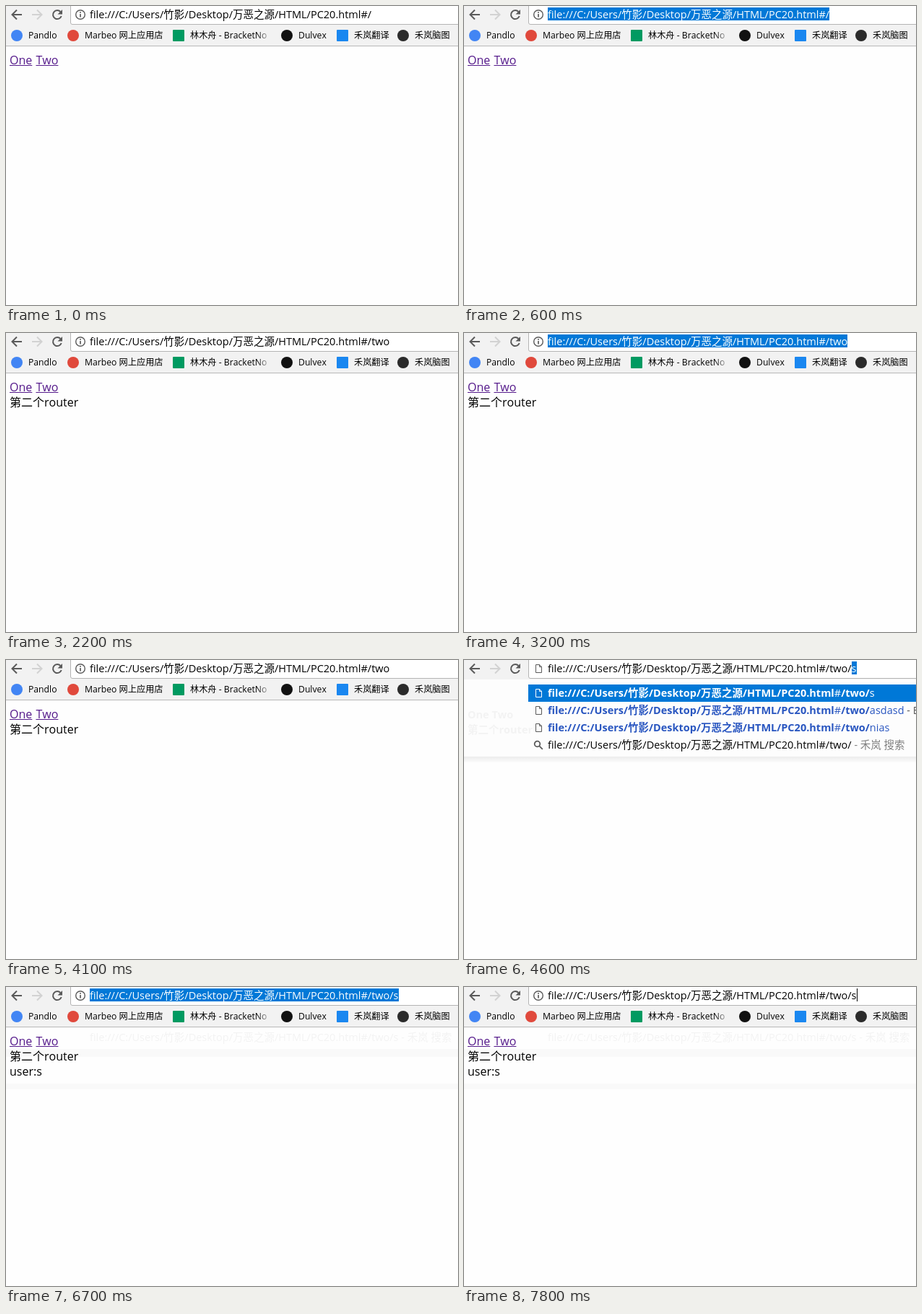
An HTML page for the animation above (8 s loop, 626 by 415 pixels).

```html
<!DOCTYPE html>
<html lang="zh-CN">
<head>
<meta charset="utf-8">
<style>
  html, body { margin: 0; width: 100%; height: 100%; overflow: hidden; }
  body {
    position: relative; background: #fefefe; color: #000; white-space: pre;
    font: 14.5px/19px "Open Sans", "Noto Sans CJK SC", "Noto Sans CJK", sans-serif;
    font-kerning: none;
  }
  body > *, .mark, .mark i, .row, .row svg, .row span, .ghost { position: absolute; }
  #toolbar { left: 0; top: 0; width: 100%; height: 55px; background: #f2f2f2; border-bottom: 1px solid #b8b8b8; }
  #address { left: 89px; top: -4px; width: 560px; height: 28px; background: #fff; border: 1px solid #b4b4b4; border-radius: 3px; }
  #icons, #marks { left: 0; top: 0; }
  #url { left: 116px; top: 2px; height: 18px; display: flex; }
  #url b { font-weight: 400; height: 18px; }
  #url b.on { background: #0078d7; color: #fff; }
  #url i { width: 1px; height: 18px; background: #000; }
  .mark { top: 30px; height: 23px; padding: 0 5px 0 30px; border-radius: 3px; font-size: 12.2px; line-height: 22px; }
  .mark i { left: 6px; top: 3px; width: 16px; height: 16px; }
  .fade { display: block; width: 113px; overflow: hidden; -webkit-mask: linear-gradient(90deg, #000 82%, transparent); mask: linear-gradient(90deg, #000 82%, transparent); }
  #page { left: 5px; top: 65px; font-size: 16px; line-height: 21px; word-spacing: 1px; }
  #page u { color: #551a8b; text-decoration-thickness: 1px; }
  .drop { left: 0; top: 27px; width: 100%; background: #fdfdfd; }
  .drop::after { content: ""; position: absolute; left: 0; top: 100%; width: 100%; height: 8px; background: linear-gradient(#ececec, #fbfbfb); }
  .row { left: 89px; right: 0; height: 24px; overflow: hidden; color: #2956c0; }
  .row svg { left: -89px; top: 0; }
  .row span { left: 27px; top: 2px; }
  .row em { font-style: normal; font-weight: 400; }
  .row.top { background: #0078d7; color: #fff; }
  .row.search { color: #000; }
  .row.search small { font-size: inherit; color: #808080; }
  .ghost { color: #f3f3f3; }
  .drop .ghost { font-weight: 700; }
  #afterglow { left: 0; top: 0; width: 100%; }
  #afterglow .band { position: absolute; left: 0; width: 100%; background: #f9f9f9; }
</style>
</head>
<body>
<div id="afterglow"></div>
<div id="page"></div>
<div id="toolbar"></div>
<div id="address"></div>
<div id="marks"></div>
<div id="full" class="drop" style="height:107px"></div>
<div id="short" class="drop" style="height:59px"></div>
<svg id="icons" width="115" height="25" fill="none" stroke="#5a5a5a" stroke-width="2">
  <path d="M22 12H9M15 5.500l-6.500 6.500 6.500 6.500"/>
  <path d="M36 12h13M43 5.500l6.500 6.500-6.500 6.500" stroke="#d2d2d2"/>
  <path d="M75.500 8A6 6 0 1 0 76.700 14"/>
  <path d="M78 5v6.500h-6.500z" fill="#5a5a5a" stroke="none"/>
  <g id="info" stroke-width="1.400"><circle cx="103" cy="12" r="6.300"/><path d="M103 11v4.500M103 8v1.700" stroke-width="1.700"/></g>
  <g id="doc" stroke-width="1"></g>
</svg>
<div id="url"></div>
<script>
const $ = id => document.getElementById(id);
const base = 'file:///C:/Users/竹影/Desktop/万恶之源/HTML/PC20.html#/';
const boldBase = base.replace('#', '<em>#</em>') + 'two/';
const docPath = '<path d="M99.5 6.500h5l3 3v8h-8zM104.500 6.500v3h3"/>';
const lensPath = '<g stroke-width="1.800"><circle cx="101.500" cy="10.500" r="3.800"/><path d="M104.300 13.300l4.500 4.500"/></g>';
$('doc').innerHTML = docPath;

const bookmarks = [
  [1, 'Pandlo', '#4285f4', true],
  [79, 'Marbeo 网上应用店', '#e0493c', true],
  [225, '<span class="fade">林木舟 - BracketNo</span>', '#009a61', false],
  [375, 'Dulvex', '#111', true],
  [452, '禾岚翻译', '#1a87f0', false],
  [536, '禾岚脑图', '#2b2b2b', true],
];
$('marks').innerHTML = bookmarks.map(([x, label, color, round]) =>
  `<div class="mark" style="left:${x}px"><i style="background:${color};border-radius:${round ? 8 : 1}px"></i>${label}</div>`).join('');
const marks = [...$('marks').children];

function row(index, html, kind = '') {
  const stroke = kind === 'top' ? '#fff' : '#5a5a5a';
  const icon = kind === 'search' ? lensPath : docPath;
  return `<div class="row ${kind}" style="top:${7 + index * 24}px">
    <svg width="115" height="24" fill="none" stroke="${stroke}">${icon}</svg><span>${html}</span></div>`;
}
const match = tail => `<b>${boldBase}</b>${tail}`;
const search = tail => `${base}two/${tail}<small> - 禾岚 搜索</small>`;
const ghost = (x, y, text) => `<div class="ghost" style="left:${x}px;top:${y}px">${text}</div>`;

$('full').innerHTML = ghost(5, 39, 'One Two') + ghost(5, 60, '第二个router') +
  row(0, match('s'), 'top') + row(1, match('asdasd<em style="color:#555"> - E</em>')) +
  row(2, match('nias')) + row(3, search(''), 'search');
$('short').innerHTML = row(0, match('s'), 'top') + row(1, search('s'), 'search');
$('afterglow').innerHTML = '<div class="band" style="top:86px;height:11px"></div>' +
  '<div class="band" style="top:134px;height:8px"></div>' +
  ghost(116, 60, base + 'two/s - 禾岚 搜索');

const selections = [[500, 1000], [3100, 3600], [6600, 7800]];
const carets = [[1000, 1500], [2000, 2100], [3600, 4100], [4700, 5000], [7800, 8000]];
const hovers = [[200, 400, 5], [400, 500, 4], [1300, 1500, 1], [2800, 3100, 5]];

const setHtml = (el, html) => { if (el.shown !== html) el.innerHTML = el.shown = html; };
const show = (id, on) => { $(id).style.display = on ? '' : 'none'; };

function draw() {
  const t = performance.now() % 8000;
  const within = ([from, to]) => t >= from && t < to;
  const listing = within([4600, 5000]);
  const completing = within([4600, 4700]);

  const path = base + (t >= 2100 ? 'two' : '') + (t >= 4600 ? '/' : '') + (t >= 4700 ? 's' : '');
  setHtml($('url'), `<b class="${selections.some(within) ? 'on' : ''}">${path}</b>` +
    (completing ? '<b class="on">s</b>' : '') + (carets.some(within) ? '<i></i>' : ''));
  setHtml($('page'), '<u>One</u> <u>Two</u>' + (t >= 2100 ? '\n第二个router' : '') + (t >= 5100 ? '\nuser:s' : ''));

  const hover = hovers.find(within);
  marks.forEach((mark, i) => { mark.style.background = hover && hover[2] === i ? '#e3e3e3' : ''; });
  show('full', completing);
  show('short', listing && !completing);
  show('info', !listing);
  show('doc', listing);
  show('afterglow', t >= 5000);
  requestAnimationFrame(draw);
}
draw();
</script>
</body>
</html>
```
